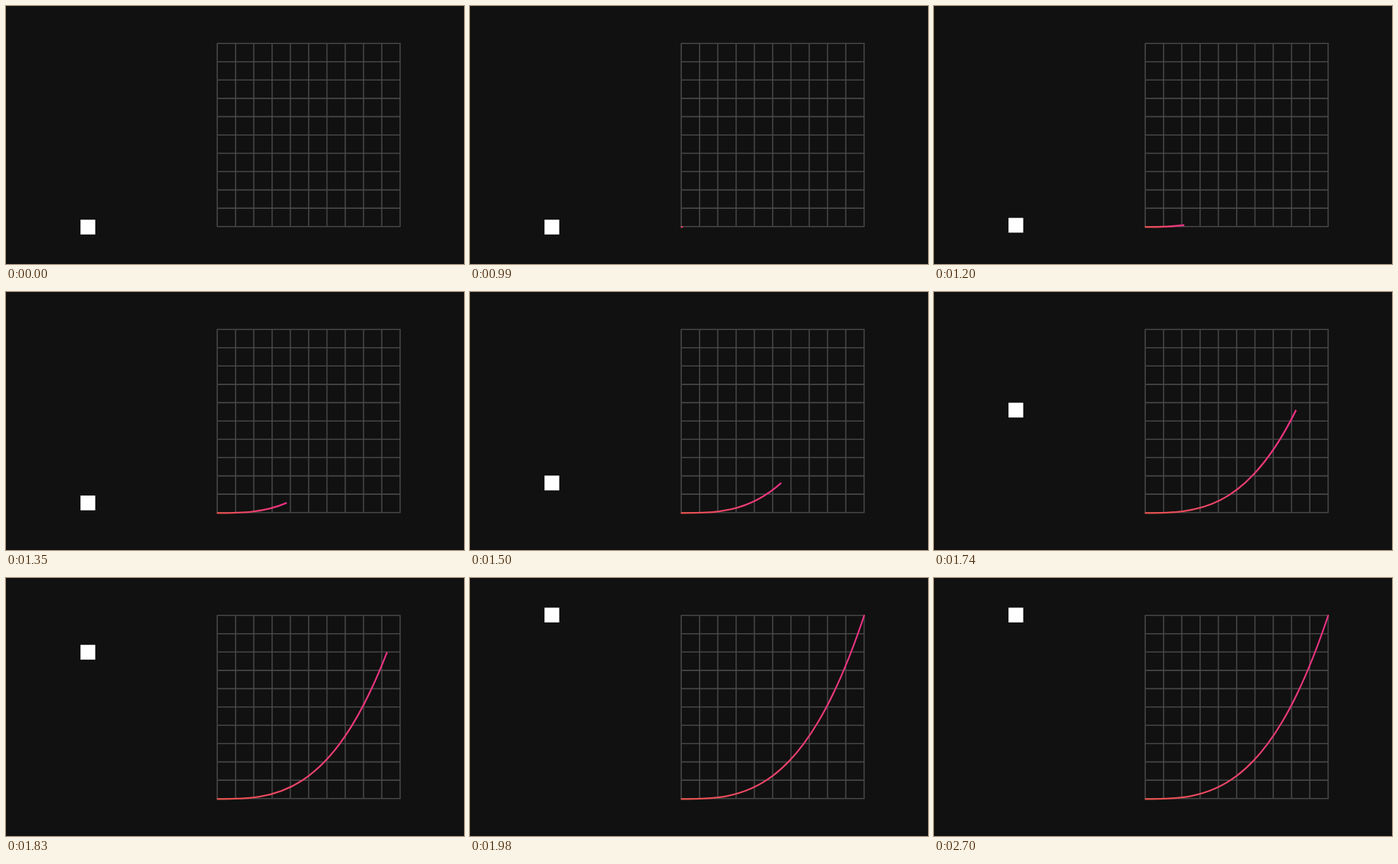
Write an HTML page that moves like this. It is 640 px wide and 360 px high and loops after 2.79 s.

```html
<!DOCTYPE html>
<html lang="en">
<head>
<meta charset="utf-8">
<title>Cubic ease-in</title>
<style>
  html, body { margin: 0; width: 100%; height: 100%; overflow: hidden; background: #111; }
  svg { display: block; width: 100vw; height: 100vh; }
  #grid { stroke: #484848; stroke-width: 1.6; stroke-linecap: square; }
  #curve { fill: none; stroke: url(#ink); stroke-width: 2.3; }
</style>
</head>
<body>
<svg viewBox="0 0 640 360">
  <defs>
    <linearGradient id="ink" gradientUnits="userSpaceOnUse" x1="294.6" y1="0" x2="551" y2="0">
      <stop offset="0" stop-color="#e9554e"/>
      <stop offset="1" stop-color="#ea3084"/>
    </linearGradient>
  </defs>
  <path id="grid"/>
  <path id="curve"/>
  <rect id="box" x="104.1" y="298.2" width="20.6" height="20.6" fill="#fff"/>
</svg>
<script>
  const LOOP = 2790, STEP = 30, BEGIN = 990;
  const X0 = 294.6, Y0 = 308.3, WIDTH = 256.5, RISE = 256.8;
  const BOX_Y = 298.2;
  // time and progress along the x axis
  const PACE = [[990, 0.011], [1200, 0.215], [1500, 0.547], [1740, 0.824], [1893, 1]];

  const $ = id => document.getElementById(id);
  const grid = $('grid'), curve = $('curve'), box = $('box'), ink = $('ink');

  function drawGrid() {
    const left = 295.2, top = 52.2, cell = 25.55, size = cell * 10;
    let d = '';
    for (let i = 0; i <= 10; i++) {
      const at = i * cell;
      d += `M${left + at} ${top}v${size}M${left} ${top + at}h${size}`;
    }
    grid.setAttribute('d', d);
  }

  function progress(t) {
    if (t < BEGIN) return 0;
    for (let i = 1; i < PACE.length; i++) {
      const [t0, p0] = PACE[i - 1], [t1, p1] = PACE[i];
      if (t < t1) return p0 + (p1 - p0) * (t - t0) / (t1 - t0);
    }
    return 1;
  }

  function render(t) {
    const p = progress(t);
    const w = WIDTH * p, lift = RISE * p ** 3;
    box.setAttribute('y', BOX_Y - lift);
    // a cubic Bezier with two flat handles is exactly y = x^3
    curve.setAttribute('d', p
      ? `M${X0} ${Y0}c${w / 3} 0 ${2 * w / 3} 0 ${w} ${-lift}`
      : '');
    ink.setAttribute('x2', X0 + Math.max(w, 1));
  }

  const start = performance.now();
  function tick(now) {
    const t = Math.max(0, now - start) % LOOP;
    render(Math.floor(t / STEP) * STEP);
    requestAnimationFrame(tick);
  }

  drawGrid();
  render(0);
  requestAnimationFrame(tick);
</script>
</body>
</html>
```
